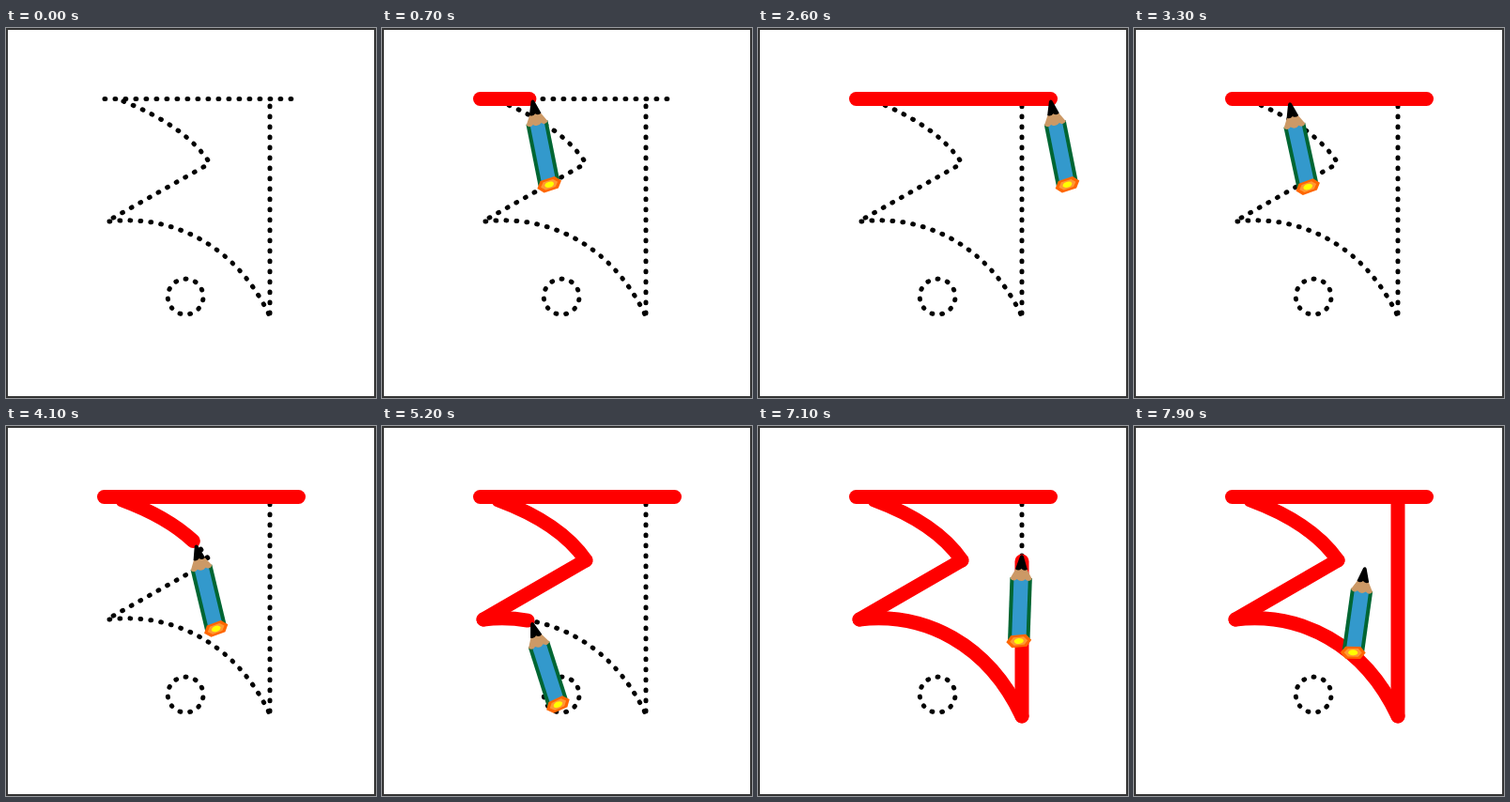
Recreate the animation shown at these times as an HTML page. Size 394 by 394 pixels, loop 8000 ms.

```html
<!DOCTYPE html>
<html lang="en">
<head>
<meta charset="utf-8">
<title>Letter tracing</title>
<style>
html, body { margin: 0; width: 100%; height: 100%; overflow: hidden; background: #fff; }
svg { display: block; width: 100vw; height: 100vh; }
#dots path { fill: none; stroke: #000; stroke-width: 5; stroke-linecap: round; stroke-dasharray: .8 10.2; }
#ink path { fill: none; stroke: #f00; stroke-width: 15; stroke-linecap: round; }
</style>
</head>
<body>
<svg viewBox="0 0 394 394">
  <rect x="1" y="1" width="392" height="392" fill="none" stroke="#333" stroke-width="2"/>
  <g id="dots">
    <path d="M105 75.5H304"/>
    <path d="M125 78Q189 103.5 215.5 141.5"/>
    <path d="M210.7 147.8L113.5 202.5"/>
    <path d="M110 206C178 198 245 232 280 305"/>
    <path d="M281 83V304"/>
    <path d="M190.2 267.2a18.9 18.9 0 1 1 -.1 0" transform="translate(1)" pathLength="121"/>
  </g>
  <g id="ink"></g>
  <g id="pencil">
    <path fill="#063" d="M-11.7 24H11.7V89L-11.7 91Z"/>
    <path fill="#39c" d="M-7.7 22H7.7V90H-7.7Z"/>
    <path fill="#c96" d="M-5.5 14H5.5L11.7 25Q8 29 4.5 25.5Q0 29.5 -4.5 25.5Q-8 29 -11.7 25Z"/>
    <path fill="#000" d="M-1.8 .8Q0 -1.6 1.8 .8L6.4 15Q3 17.5 0 14.5Q-3 17.5 -6.4 15Z"/>
    <g transform="translate(0 91.5) rotate(-7)">
      <path fill="#f60" d="M-13.5 0L-8 -6.5H8L13.5 0L8 6.5H-8Z"/>
      <path fill="#f93" d="M-9.500 0L-5.500 -4.300H5.500L9.500 0L5.500 4.300H-5.500Z"/>
      <ellipse rx="5" ry="3" fill="#ff0"/>
    </g>
  </g>
</svg>
<script>
const LOOP = 8000, STEP = 100;

// path, pencil start and end, ink start and end (no ink while the pencil travels)
const legs = [
  ["M104.5 75.5H311.5", 0, 2600, 90, 2500],
  ["M311.5 75.5L124 79", 2600, 3500],
  ["M124 79Q190 103.5 217 143", 3500, 4250, 3550, 4270],
  ["M217 143L108 206", 4250, 4900, 4380, 4900],
  ["M108 206C178 198 245 232 281 309", 4900, 6150, 4920, 6200],
  ["M281 309V76", 6150, 7430, 6250, 7450],
  ["M281 76L190 266", 7430, 8650]
];
// time, pencil rotation in degrees
const turns = [[0, -11.3], [2600, -11.3], [4100, -13.5], [5200, -17.7], [5400, -10],
  [6150, 76], [6300, 70], [7430, -26], [7900, 8], [8000, 10]];

const ink = document.getElementById("ink");
const pencil = document.getElementById("pencil");
const progress = (t, a, b) => Math.min(1, Math.max(0, (t - a) / (b - a)));

const lines = legs.map(([d]) => {
  const line = document.createElementNS("http://www.w3.org/2000/svg", "path");
  line.setAttribute("d", d);
  line.style.display = "none";
  ink.append(line);
  return { line, length: line.getTotalLength() };
});

function rotation(t) {
  const i = turns.findIndex(([time]) => time > t);
  const [t0, a] = turns[i - 1], [t1, b] = turns[i];
  return a + (b - a) * progress(t, t0, t1);
}

function draw(t) {
  legs.forEach(([, start, end, inkStart, inkEnd], i) => {
    const { line, length } = lines[i];
    if (inkEnd) {
      const p = progress(t, inkStart, inkEnd);
      line.style.display = p > 0 ? "" : "none";
      line.style.strokeDasharray = p < 1 ? `${p * length} ${length * 2}` : "none";
    }
    if (t >= start && t < end) {
      const { x, y } = line.getPointAtLength(length * progress(t, start, end));
      pencil.setAttribute("transform", `translate(${x} ${y + 1.5}) rotate(${rotation(t)})`);
    }
  });
  pencil.style.display = t > 0 ? "" : "none";
}

function tick() {
  draw(Math.floor(performance.now() % LOOP / STEP) * STEP);
  requestAnimationFrame(tick);
}
tick();
</script>
</body>
</html>
```
